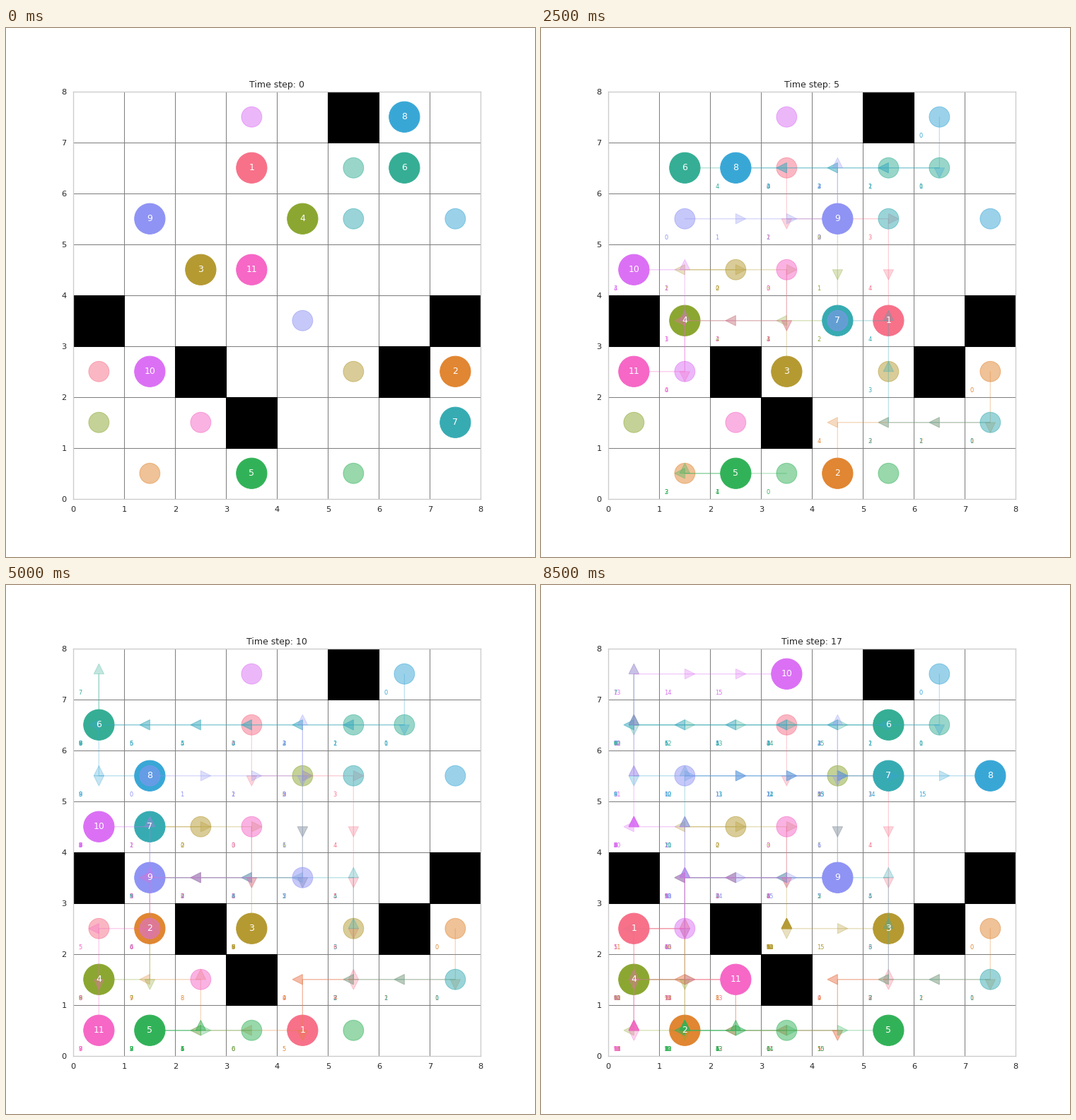
A matplotlib script for the animation above (9 s loop, 748 by 748 pixels).

```python
import math
import numpy as np
import matplotlib.pyplot as plt
from matplotlib.animation import FuncAnimation
from matplotlib.patches import Circle, Rectangle

SIZE = 8
STEPS = 18
INK = "0.15"
WALLS = [(5, 7), (0, 3), (7, 3), (2, 2), (6, 2), (3, 1)]
MOVES = {"U": (0, 1), "D": (0, -1), "L": (-1, 0), "R": (1, 0), "W": (0, 0)}

# start cell and moves of each agent (W = wait)
ROUTES = [
    ((3, 6), "DRRDDDDWLDLLULUL"),
    ((7, 2), "DLLLDLLULULDRD"),
    ((2, 4), "LRRDD" + "W" * 9 + "RR"),
    ((4, 5), "DDLLLDDLWWWRDLWWU"),
    ((3, 0), "LLWRWWL" + "W" * 5 + "RRRR"),
    ((6, 6), "LLLLLLUDWWWRRRRR"),
    ((7, 1), "LLUULLLLWUWURRRR"),
    ((6, 7), "DLLLLLLDWRRRRRRR"),
    ((1, 5), "RRRUDDDLLLWDURRR"),
    ((1, 2), "UUL" + "W" * 7 + "UUURRR"),
    ((3, 4), "DLLDLDD" + "W" * 6 + "URR"),
]

TO_RGB = np.array([[3.2406, -1.5372, -0.4986],
                   [-0.9689, 1.8758, 0.0415],
                   [0.0557, -0.2040, 1.0570]])


def husl(hue, sat=89.1, light=64.35):
    """Colour with even lightness for a hue in degrees."""
    s, c = math.sin(math.radians(hue)), math.cos(math.radians(hue))
    y = ((light + 16) / 116) ** 3
    limits = []
    for m1, m2, m3 in TO_RGB:
        top = (0.99915 * m1 + 1.05122 * m2 + 1.14460 * m3) * y
        bottom = ((0.86330 * m3 - 0.17266 * m2) * s
                  + (0.12949 * m3 - 0.38848 * m1) * c) * y
        for edge in (0, 1):
            limits.append(light * (top - 1.05122 * edge)
                          / (bottom + 0.17266 * s * edge))
    chroma = min(v for v in limits if v > 0) * sat / 100
    u = c * chroma / (13 * light) + 0.19784
    v = s * chroma / (13 * light) + 0.46834
    x = 9 * y * u / (4 * v)
    z = (9 * y - 15 * v * y - v * x) / (3 * v)
    lin = np.clip(TO_RGB @ [x, y, z], 0, 1)
    return tuple(np.where(lin <= 0.0031308, 12.92 * lin,
                          1.055 * lin ** (1 / 2.4) - 0.055))


def walk(start, moves):
    cells = [start]
    for m in moves:
        dx, dy = MOVES[m]
        cells.append((cells[-1][0] + dx, cells[-1][1] + dy))
    return cells


PATHS = [walk(*route) for route in ROUTES]
COLORS = [husl((k / len(PATHS) + 0.01) * 359) for k in range(len(PATHS))]

plt.rcParams.update({
    "font.family": "DejaVu Sans", "font.size": 12, "text.color": INK,
    "axes.edgecolor": "0.8", "axes.linewidth": 1.25, "axes.axisbelow": True,
    "axes.titlesize": 12, "patch.linewidth": 1,
})
fig, ax = plt.subplots(figsize=(10, 10), dpi=74.8)


def disc(cell, radius, color, alpha=1):
    ax.add_patch(Circle((cell[0] + 0.5, cell[1] + 0.5), radius,
                        color=color, alpha=alpha))


def draw_agent(number, path, color, step):
    done = min(step, len(path) - 1)
    disc(path[0], 0.2, color, 0.5)
    disc(path[-1], 0.2, color, 0.5)
    for i in range(done):
        (x, y), (nx, ny) = path[i], path[i + 1]
        # a wait has zero length and shows as a head pointing up
        ax.arrow(x + 0.5, y + 0.5, nx - x, ny - y, head_width=0.2,
                 head_length=0.2, fc=color, ec=color, alpha=0.3)
        ax.text(x + 0.1, y + 0.1, str(i), color=color, fontsize=8)
    x, y = path[done]
    disc((x, y), 0.3, color)
    ax.text(x + 0.5, y + 0.5, str(number), color="white",
            ha="center", va="center")


def draw(step):
    ax.clear()
    ax.set_aspect("equal")
    ax.set(xlim=(0, SIZE), ylim=(0, SIZE),
           xticks=range(SIZE + 1), yticks=range(SIZE + 1))
    ax.tick_params(length=0, pad=9.5, labelsize=11, labelcolor=INK)
    ax.grid(True, color="gray", linestyle="-", linewidth=1)
    ax.set_title(f"Time step: {step}")
    for cell in WALLS:
        ax.add_patch(Rectangle(cell, 1, 1, color="black"))
    for k, (path, color) in enumerate(zip(PATHS, COLORS)):
        draw_agent(k + 1, path, color, step)
    return []


anim = FuncAnimation(fig, draw, frames=STEPS, init_func=lambda: draw(0),
                     interval=500, repeat=True, repeat_delay=0, blit=False)
plt.show()
```
